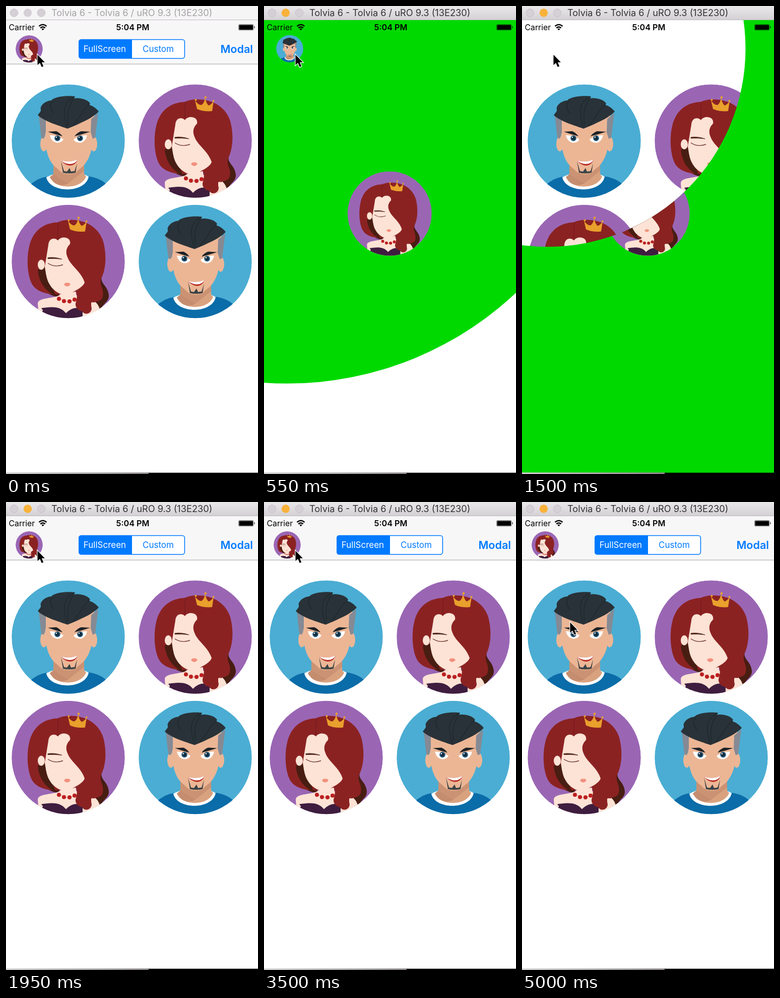
An HTML page for the animation above (5.05 s loop, 500 by 927 pixels).

```html
<!DOCTYPE html>
<html lang="en">
<head>
<meta charset="utf-8">
<title>Circle reveal transition</title>
<style>
  html, body { margin: 0; width: 100%; height: 100%; overflow: hidden; background: #fff; }
  svg { display: block; width: 100vw; height: 100vh; font-family: Inter, Roboto, sans-serif; }
</style>
</head>
<body>
<svg viewBox="0 0 500 927">
  <defs>
    <linearGradient id="bar" x2="0" y2="1">
      <stop stop-color="#ebe8eb"/><stop offset="1" stop-color="#d3d0d3"/>
    </linearGradient>
    <linearGradient id="shade">
      <stop stop-color="#d0d0d0"/><stop offset="1" stop-color="#8a8686"/>
    </linearGradient>
    <clipPath id="round"><circle r="112.3"/></clipPath>
    <clipPath id="reveal"><path id="revealPath" clip-rule="evenodd"/></clipPath>

    <!-- Avatars are centred on the origin with a radius of 112.3 -->
    <g id="man" clip-path="url(#round)">
      <circle r="112.3" fill="#4badd3"/>
      <g transform="translate(-123.5 -267.5)">
        <path d="M48 354C62 342 74 338 90 337H158C175 338 188 343 201 354V390H48Z" fill="#0a6ca8"/>
        <path d="M80 339C86 371 157 372 164 338L154 333H94Z" fill="#fff"/>
        <path d="M94 300H155V333L159 338C149 364 97 364 87 339L94 333Z" fill="#d9a27f"/>
        <path d="M94 312L108 329Q125 339 140 329L155 312V327L124 351L94 333Z" fill="#cb9374"/>
        <path d="M94 333L124 351Q110 359 96 350L87 339Z" fill="#c58d6f"/>
        <g fill="#ecb695">
          <ellipse cx="75" cy="273" rx="7" ry="15"/>
          <ellipse cx="174" cy="273" rx="7" ry="15"/>
          <path d="M76 212L78 268C80 294 87 309 97 318L109 328Q124 336 139 328L152 318C163 307 170 291 172 268L176 210Z"/>
        </g>
        <path d="M65 216L79 226V250L75 263L70 261ZM183 212L169 224L168 250L172 263L177 261Z" fill="#858a94"/>
        <path d="M63 216C67 211 70 208 69 205C67 199 76 188 90 187C97 178 127 177 137 179L135 183C151 181 163 187 167 193L165 196C174 198 181 205 184 209C172 222 151 230 139 236L122 243C106 237 76 229 63 216Z" fill="#293238"/>
        <path d="M136 180C112 190 113 211 121 240M134 184C121 203 122 216 124 236M166 195C151 205 148 222 132 237M93 188C85 196 90 207 95 213" fill="none" stroke="#1f282d" stroke-width="1.500"/>
        <path d="M83 249L100 248Q107 251 112 258L98 254ZM167 249L149 248Q141 251 136 258L151 254Z" fill="#1d2226"/>
        <path d="M87 256Q99 255 114 264Q111 271 101 271Q90 269 87 256ZM161 256Q149 255 134 264Q137 271 148 271Q158 269 161 256Z" fill="#fff"/>
        <g fill="#27587a"><circle cx="102" cy="262" r="5.800"/><circle cx="147" cy="262" r="5.800"/></g>
        <g fill="#122a3a"><circle cx="102" cy="262" r="3.500"/><circle cx="147" cy="262" r="3.500"/></g>
        <g fill="#fff"><circle cx="100" cy="260" r="1.200"/><circle cx="145" cy="260" r="1.200"/></g>
        <path d="M109 307L113 330Q125 333 138 330L141 312L136 327L129 328L126 321L121 328L115 327Z" fill="#3b4246"/>
        <path d="M110 306Q126 311 142 304Q138 316 126 316Q115 314 110 306Z" fill="#b3261e"/>
        <path d="M110 306Q126 311 142 304Q138 313 126 313Q115 312 110 306Z" fill="#fff"/>
      </g>
    </g>

    <g id="woman" clip-path="url(#round)">
      <circle r="112.3" fill="#9a66b4"/>
      <g transform="translate(-375.5 -267.5)">
        <path d="M314 284L318 310C324 327 340 336 358 338L350 290ZM430 285L442 298C438 311 455 316 456 335C456 349 443 350 442 362L437 371L415 350Z" fill="#481d12"/>
        <path d="M318 390L315 351C316 338 345 342 359 334V320H391V334C409 341 435 340 438 364L432 390Z" fill="#fde3d5"/>
        <path d="M325 390V364L322 360C340 357 360 355 371 370C383 358 395 358 404 362V390Z" fill="#3e1d3f"/>
        <path d="M325 366L321 385" stroke="#3e1d3f" stroke-width="2"/>
        <path d="M355 190C375 180 430 182 445 228C453 258 449 286 441 301C436 315 447 320 444 337C441 351 421 343 422 358C423 373 407 374 403 366C395 365 387 357 391 347C393 339 394 333 390 327C360 336 318 336 304 313C293 293 293 258 298 238C305 207 326 191 355 190Z" fill="#8b2222"/>
        <path d="M315 284C317 306 328 326 350 335L343 312L329 280Z" fill="#481d12"/>
        <ellipse cx="322" cy="274" rx="7" ry="10" fill="#fde3d5"/>
        <path d="M336 235C337 220 350 220 355 226C362 216 382 219 379 233C371 241 370 250 374 259C380 276 401 287 408 309C405 319 389 325 379 332C362 338 345 325 338 312C332 302 331 290 329 278Z" fill="#fde3d5"/>
        <path d="M356 190Q354 207 355 224" fill="none" stroke="#75191c" stroke-width="1.300"/>
        <path d="M335 260Q349 258 363 263Q349 261 335 262Z" fill="#481d12" stroke="#481d12" stroke-width=".8"/>
        <path d="M335 271Q349 280 365 274" fill="none" stroke="#6b332b" stroke-width="1.400"/>
        <path d="M367 313Q370 308 373 310Q377 308 380 313Q373 321 367 313Z" fill="#f2917f"/>
        <path d="M354 337Q373 354 391 341" fill="none" stroke="#d98f78"/>
        <g fill="#bb1f20">
          <circle cx="357" cy="341.500" r="4"/><circle cx="367" cy="346" r="4"/>
          <circle cx="378" cy="346.500" r="4"/><circle cx="388" cy="343" r="4"/>
        </g>
        <path d="M421 349Q420 368 433 372L438 361Q429 345 421 349Z" fill="#fde3d5"/>
        <g fill="#e9a02c">
          <path d="M375 187Q382 197 388 196Q394 192 395 181Q397 193 402 197Q407 196 412 188L409 208Q393 210 379 204Z"/>
          <circle cx="376.500" cy="186" r="2"/><circle cx="396" cy="181" r="2.300"/><circle cx="411.500" cy="188" r="2"/>
        </g>
      </g>
    </g>
  </defs>

  <rect width="500" height="927" fill="#fff"/>
  <g id="home">
    <use href="#man" x="123.500" y="267.500"/>
    <use href="#woman" x="375.500" y="267.500"/>
    <use href="#woman" x="123.500" y="506"/>
    <use href="#man" x="375.500" y="506"/>
    <g id="navBar" font-size="17" text-anchor="middle">
      <rect y="28" width="500" height="87" fill="#f8f7f8"/>
      <rect y="114.500" width="500" height="1" fill="#9c9c9c"/>
      <use href="#woman" transform="translate(46 85) scale(.24)"/>
      <rect x="144.800" y="66.500" width="209.600" height="37.300" rx="4.500" fill="#fff" stroke="#007aff" stroke-width="1.600"/>
      <path d="M250 66H149.500Q144.500 66 144.500 71V99Q144.500 104 149.500 104H250Z" fill="#007aff"/>
      <text x="196" y="90.500" fill="#fff">FullScreen</text>
      <text x="302" y="90.500" fill="#007aff">Custom</text>
      <text x="490" y="93" fill="#007aff" font-size="21.600" font-weight="600" text-anchor="end">Modal</text>
    </g>
  </g>

  <g id="detail" clip-path="url(#reveal)">
    <rect width="500" height="927" fill="#00d900"/>
    <use href="#man" transform="translate(51 84.500) scale(.24)"/>
    <use href="#woman" transform="translate(249.300 411) scale(.744)"/>
  </g>

  <g id="statusBar">
    <text x="5.500" y="48" font-size="15.800">Carrier</text>
    <path d="M65.500 40Q73 33.500 80.500 40M68.300 43.500Q73 39.500 77.700 43.500" fill="none" stroke="#000" stroke-width="2.500"/>
    <path d="M70.300 45.500Q73 43.300 75.700 45.500L73 48.200Z"/>
    <text x="251.500" y="48" font-size="16.200" font-weight="600" text-anchor="middle">5:04 PM</text>
    <rect x="461.500" y="36.500" width="29.500" height="11.500" rx="2" fill="none" stroke="#000" stroke-opacity=".5"/>
    <rect x="462.500" y="37.500" width="27.500" height="9.500" rx="1"/>
    <path d="M492.500 39.500Q495 42 492.500 44.500Z"/>
  </g>

  <rect y="924" width="284" height="3" fill="url(#shade)"/>
  <rect x="283" y="924.500" width="217" height="2.500"/>

  <g id="titleBar">
    <rect id="titleFill" width="500" height="28"/>
    <rect y="27" width="500" height="1" fill="#bdb9bd"/>
    <g stroke="#bfbabf" stroke-width=".8" fill="#d5d0d5">
      <circle cx="16" cy="13.500" r="7.800"/>
      <circle cx="70" cy="13.500" r="7.800"/>
    </g>
    <circle id="minimise" cx="43" cy="13.500" r="8.200"/>
    <text id="titleText" x="90" y="20" font-size="18.200">Tolvia 6 - Tolvia 6 / uRO 9.3 (13E230)</text>
  </g>

  <path id="cursor" d="M0 0V20.500L4.700 16.200L8.300 24.300L11.700 22.800L8.400 15H14.500Z" stroke="#fff" stroke-width="2.400" paint-order="stroke"/>
</svg>

<script>
  const LOOP = 5050, STEP = 50;
  const ACTIVATE = 50, PUSH = 208, POP = 1303, REVEAL = 500;
  const BUTTON_RADIUS = 27;
  const HOME_BUTTON = { x: 46, y: 85 }, DETAIL_BUTTON = { x: 51, y: 84.5 };
  const MOVE = { start: 4500, end: 5000, from: [62.5, 96.5], to: [95.5, 238.5] };

  const el = id => document.getElementById(id);
  const progress = (t, start, length) => Math.min(1, Math.max(0, (t - start) / length));
  const mix = (a, b, p) => a + (b - a) * p;
  const smooth = p => p * p * (3 - 2 * p);

  // A circle growing from a button until it reaches the far corner.
  function growingCircle({ x, y }, p) {
    const r = mix(BUTTON_RADIUS, Math.hypot(500 - x, 927 - y), p);
    return `M${x - r} ${y}a${r} ${r} 0 1 0 ${2 * r} 0a${r} ${r} 0 1 0 ${-2 * r} 0Z`;
  }

  function drawTitle(active) {
    el('titleFill').setAttribute('fill', active ? 'url(#bar)' : '#f6f5f6');
    el('titleText').setAttribute('fill', active ? '#333' : '#a5a3a5');
    el('minimise').setAttribute('fill', active ? '#f8b23a' : '#d5d0d5');
  }

  function drawPages(t) {
    const away = t >= PUSH && t < POP + REVEAL;
    el('navBar').style.display = away ? 'none' : '';
    el('detail').style.display = away ? '' : 'none';
    if (!away) return;

    // The circle first uncovers the green page, then cuts it away.
    const clip = t < POP
      ? growingCircle(HOME_BUTTON, progress(t, PUSH, REVEAL))
      : 'M-2000-2000H3000V3000H-2000Z' + growingCircle(DETAIL_BUTTON, progress(t, POP, REVEAL));
    el('revealPath').setAttribute('d', clip);
  }

  function drawCursor(t) {
    const p = smooth(progress(t, MOVE.start, MOVE.end - MOVE.start));
    const [x, y] = MOVE.from.map((from, i) => mix(from, MOVE.to[i], p));
    el('cursor').setAttribute('transform', `translate(${x} ${y})`);
  }

  function render(now) {
    const t = Math.floor((now % LOOP) / STEP) * STEP;
    drawTitle(t >= ACTIVATE);
    drawPages(t);
    drawCursor(t);
    requestAnimationFrame(render);
  }

  render(performance.now());
</script>
</body>
</html>
```
